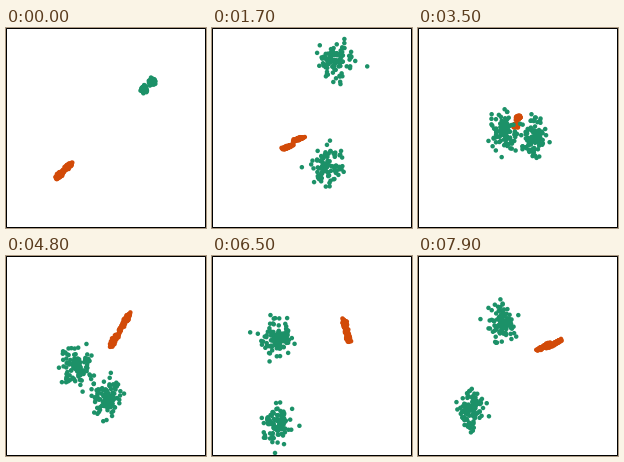
Animation of 200x200 px, one loop 8 s. Source, as a matplotlib script:

```python
import numpy as np
import matplotlib.pyplot as plt
from matplotlib.animation import FuncAnimation
from matplotlib.patches import Rectangle

SIZE, DPI = 200, 100
FRAMES, INTERVAL = 80, 100
GREEN, ORANGE = "#1c9168", "#d24a08"
POINTS = 105
MID = (1 + 1j) * SIZE / 2

# Gaps between cluster centres at a few key times, as x + yj
TIMES = np.array([0, 1.7, 2.7, 3.5, 4.8, 6.5, 7.9])
GAPS = np.array([
    [84-85j, 38-30j, 20-5j, 2+13j, -28+52j, -69+51j, -63+22j],   # green - orange
    [8-8j, 8-106j, -10-69j, -30-4j, -30-29j, -85j, 31-87j],      # green pair
    [8-8j, 11-8j, -3-3j, 2-8j, 11-19j, -3-11j, 13-4j],           # orange pair
])
slopes = np.gradient(GAPS, TIMES, axis=1)
slopes[0, 0] = 0  # the colours start at their widest separation

rng = np.random.default_rng(12)
latent = rng.standard_normal((4, 4, POINTS))


def gaps(t):
    """Cubic Hermite value of the three gaps at time t."""
    k = min(np.searchsorted(TIMES, t, side="right") - 1, len(TIMES) - 2)
    h = TIMES[k + 1] - TIMES[k]
    s = (t - TIMES[k]) / h
    return ((1 + 2 * s) * (1 - s) ** 2 * GAPS[:, k]
            + s * (1 - s) ** 2 * h * slopes[:, k]
            + s * s * (3 - 2 * s) * GAPS[:, k + 1]
            + s * s * (s - 1) * h * slopes[:, k + 1])


def project(t):
    """Turn the hidden 4-D clouds and place them around the stage centre."""
    between, green, orange = gaps(t) / 2
    c, s = np.cos(0.6 * t), np.sin(0.6 * t)
    u = c * latent[:, 0] + s * latent[:, 2]
    v = c * latent[:, 1] + s * latent[:, 3]

    # Orange clouds stretch along their own gap
    o = 0.95 * (u[:2] + 1j * v[:2]) + 0.4 * orange * latent[:2, 3]
    o += MID - between + np.array([[orange], [-orange]])

    # Green clouds open up first, then breathe sideways
    grow = np.sin(np.pi / 2 * min(t / 1.8, 1))
    wide = 6.9 + 1.1 * np.cos(2 * np.pi * (t - 1.3) / 4.2)
    sx, sy = 1.4 + grow * (np.array([wide, 8.8]) - 1.4)
    g = sx * u[2:] + 1j * sy * v[2:]
    g += MID + between + np.array([[green], [-green]])

    z = np.concatenate([o.ravel(), g.ravel()])
    return np.column_stack([z.real, z.imag])


fig = plt.figure(figsize=(SIZE / DPI, SIZE / DPI), dpi=DPI, facecolor="white")
ax = fig.add_axes([0, 0, 1, 1])
ax.set(xlim=(0, SIZE), ylim=(SIZE, 0))
ax.axis("off")
ax.add_patch(Rectangle((0.5, 0.5), SIZE - 1, SIZE - 1, fill=False,
                       ec="black", lw=72 / DPI, snap=False, zorder=3))
dots = ax.scatter(*project(0).T, s=(4.5 * 72 / DPI) ** 2, linewidths=0,
                  c=np.repeat([ORANGE, GREEN], 2 * POINTS))


def update(i):
    dots.set_offsets(project(i * INTERVAL / 1000))
    return (dots,)


anim = FuncAnimation(fig, update, frames=FRAMES, interval=INTERVAL,
                     repeat=True, repeat_delay=0)
plt.show()
```
